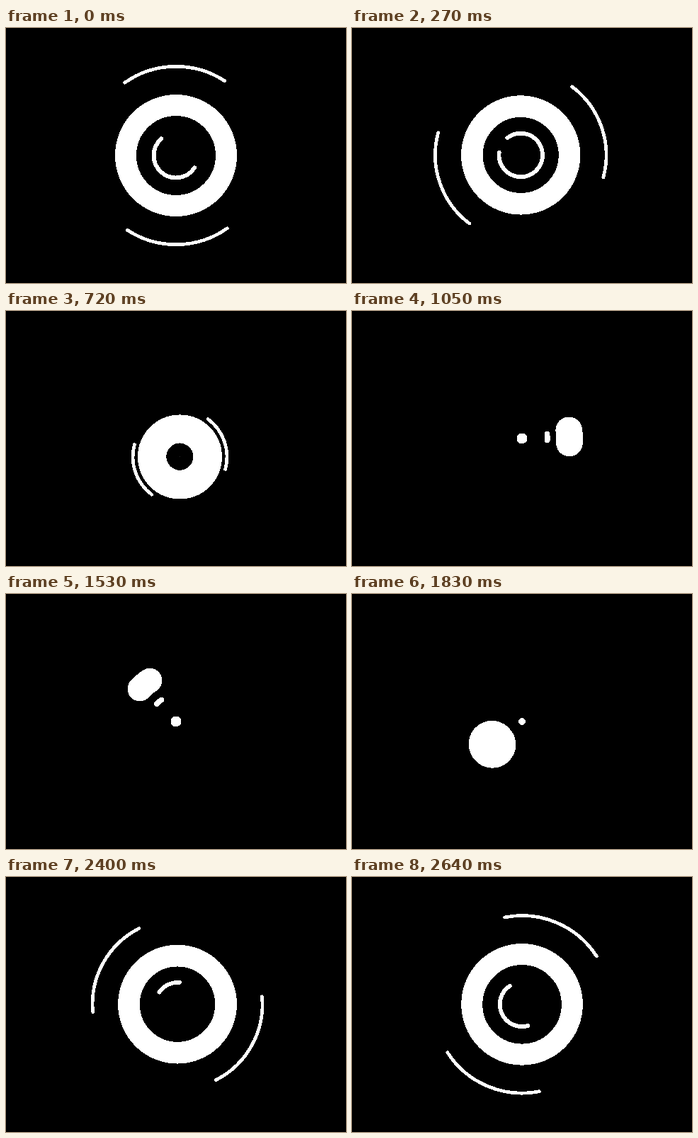
An HTML page for the animation above (2670 ms loop, 480x360 px).

```html
<!DOCTYPE html>
<html lang="en">
<head>
<meta charset="utf-8">
<title>Orbiting rings</title>
<style>
  html, body { margin: 0; width: 100%; height: 100%; overflow: hidden; background: #000; }
  svg { display: block; width: 100vw; height: 100vh; shape-rendering: crispEdges; }
  path, circle { fill: none; stroke: #fff; stroke-linecap: round; }
  #dot { fill: #fff; stroke: none; }
</style>
</head>
<body>
<svg viewBox="0 0 480 360">
  <path id="arcA"/>
  <path id="arcB"/>
  <circle id="ring"/>
  <path id="blob"/>
  <path id="inner"/>
  <path id="trail"/>
  <circle id="dot" cx="240" cy="180"/>
</svg>
<script>
const LOOP = 2670, STEP = 30, CYCLE = 90;
const CX = 240, CY = 180;
const BOUND = 86, ORBIT = 69;
const $ = id => document.getElementById(id);
const clamp = v => Math.max(0, Math.min(1, v));
const smooth = v => { v = clamp(v); return v * v * (3 - 2 * v); };
const sigmoid = v => 1 / (1 + Math.exp(-v));

function point(cx, cy, r, deg) {
  const a = deg * Math.PI / 180;
  return [cx + r * Math.cos(a), cy - r * Math.sin(a)];
}

function setArc(id, c, r, from, to, width) {
  const at = deg => point(c[0], c[1], r, deg).map(v => v.toFixed(2)).join(" ");
  const bow = `A${r} ${r} 0 0 0 `;
  const path = `M${at(from)}${bow}${at((from + to) / 2)}${bow}${at(to)}`;
  $(id).setAttribute("d", r > 0.2 && width > 0 ? path : "");
  $(id).setAttribute("stroke-width", width);
}

function setCircle(id, c, r, width) {
  const el = $(id);
  el.setAttribute("cx", c[0]);
  el.setAttribute("cy", c[1]);
  el.setAttribute("r", r);
  el.setAttribute("stroke-width", width);
}

function draw(time) {
  const n = Math.floor((time % LOOP) / STEP);
  const m = Math.min(n, CYCLE - n); // 0 = open rings, 45 = collapsed
  const heading = 90 + 8 * n;
  const d = ORBIT * sigmoid(0.0063 * m * m - 4.1) * smooth(m / 8);
  const grow = smooth((m - 23) / 10);
  const center = point(CX, CY, d, heading);

  // Two thin outer arcs, three turns per cycle
  const spin = 91 + 12 * n;
  const r = Math.max(0, 125.7 - 1.8 * d - 0.02 * m * m);
  setArc("arcA", center, r, spin - 34.2, spin + 34.2, 4.7);
  setArc("arcB", center, r, spin + 145.8, spin + 214.2, 4.7);

  // Thick ring, always touching the same outer boundary
  const edge = BOUND - d, hole = Math.max(0, 56 - 1.35 * d);
  setCircle("ring", center, (edge + hole) / 2, edge - hole);
  const tail = 15.5 * clamp((d - 52) / 14);
  setArc("blob", [CX, CY], d, heading - tail, heading, tail > 0 ? 2 * edge : 0);

  // Thin inner arc that winds into a full circle
  const di = d * (1 - 0.465 * grow);
  const turn = n > CYCLE / 2 ? n : n + CYCLE;
  const span = 0.05 + 0.95 * sigmoid(0.2 * (turn - 89.6));
  setArc("inner", point(CX, CY, di, heading), (31.4 - 0.33 * d) * (1 - grow),
    heading + 90 * (1 - span), heading + 90 + 270 * span, 5.8);

  // Small satellite and the still centre
  setArc("trail", [CX, CY], di, heading - 14 * grow, heading, 7.6 * grow);
  $("dot").setAttribute("r", 7.5 * grow);
}

const start = performance.now();
function tick() {
  draw(performance.now() - start);
  requestAnimationFrame(tick);
}
draw(0);
requestAnimationFrame(tick);
</script>
</body>
</html>
```
